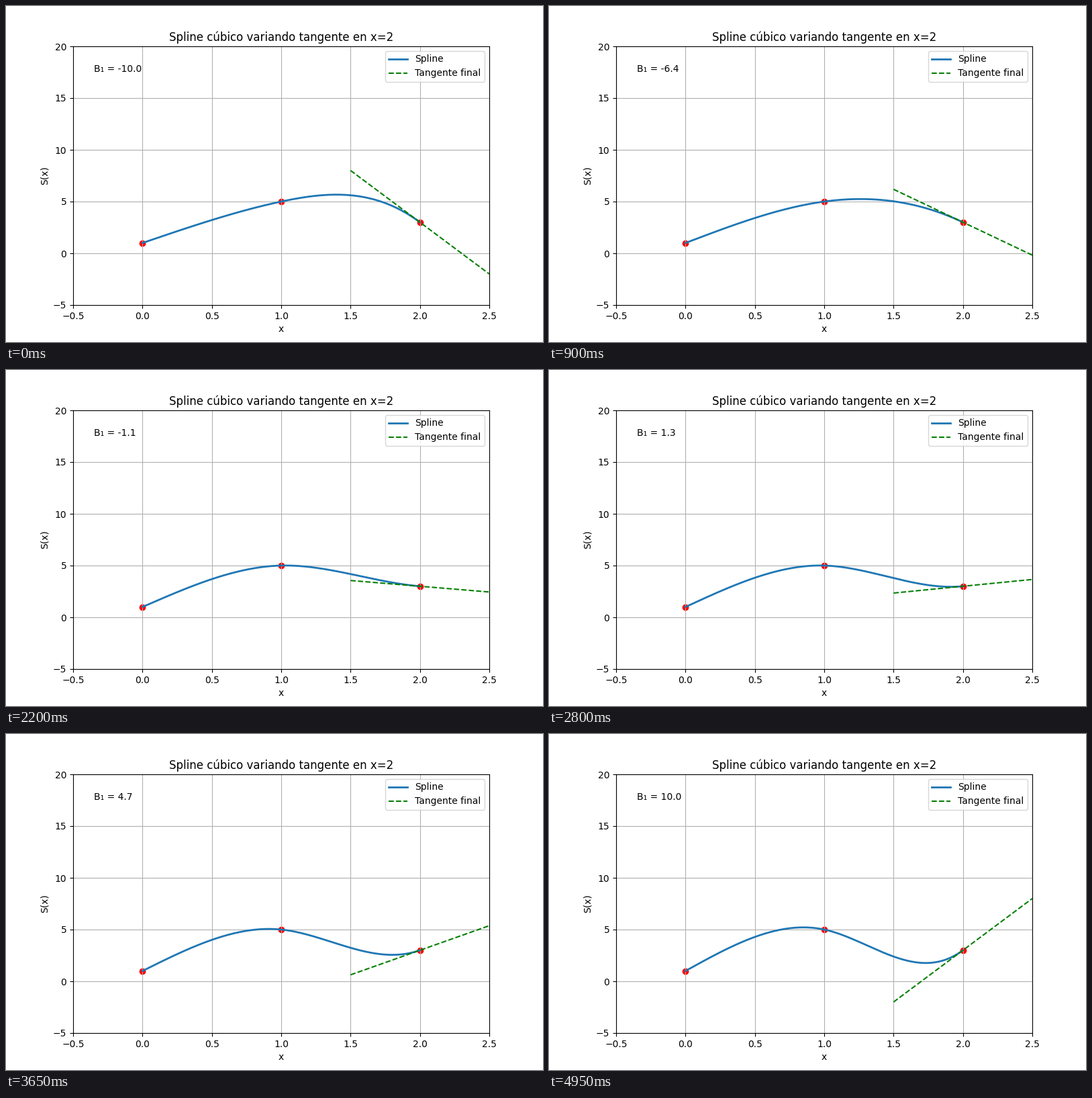
Animation, 800 px wide and 500 px high, one loop 5000 ms. Source, as a matplotlib script:

```python
import numpy as np
import matplotlib.pyplot as plt
from matplotlib.animation import FuncAnimation

FRAMES = 100
KNOTS_X = np.array([0.0, 1.0, 2.0])
KNOTS_Y = np.array([1.0, 5.0, 3.0])
slopes = np.linspace(-10, 10, FRAMES)
t = np.linspace(0, 1, 100)
spline_x = np.concatenate([t, 1 + t[1:]])
tangent_x = np.linspace(1.5, 2.5, 50)


def hermite(y0, y1, m0, m1):
    return ((2 * t**3 - 3 * t**2 + 1) * y0 + (t**3 - 2 * t**2 + t) * m0
            + (3 * t**2 - 2 * t**3) * y1 + (t**3 - t**2) * m1)


def spline(end_slope):
    """Cubic spline, natural at the start and clamped at the end."""
    a, b, c = KNOTS_Y
    m0, m1 = np.linalg.solve([[2, 1], [1, 4]],
                             [3 * (b - a), 3 * (c - a) - end_slope])
    return np.concatenate([hermite(a, b, m0, m1),
                           hermite(b, c, m1, end_slope)[1:]])


fig, ax = plt.subplots(figsize=(8, 5), dpi=100)
ax.set_xlim(-0.5, 2.5)
ax.set_ylim(-5, 20)
ax.set_title("Spline cúbico variando tangente en x=2")
ax.set_xlabel("x")
ax.set_ylabel("S(x)")
ax.grid(True)

ax.scatter(KNOTS_X, KNOTS_Y, color="red")
curve, = ax.plot([], [], lw=2, label="Spline")
tangent, = ax.plot([], [], "g--", lw=1.5, label="Tangente final")
label = ax.text(0.05, 0.9, "", transform=ax.transAxes)
ax.legend(loc="upper right")


def update(i):
    slope = slopes[i]
    curve.set_data(spline_x, spline(slope))
    tangent.set_data(tangent_x, KNOTS_Y[-1] + slope * (tangent_x - KNOTS_X[-1]))
    label.set_text(f"B₁ = {slope:.1f}")
    return curve, tangent, label


anim = FuncAnimation(fig, update, frames=FRAMES, interval=50, repeat=True)
plt.show()
```
